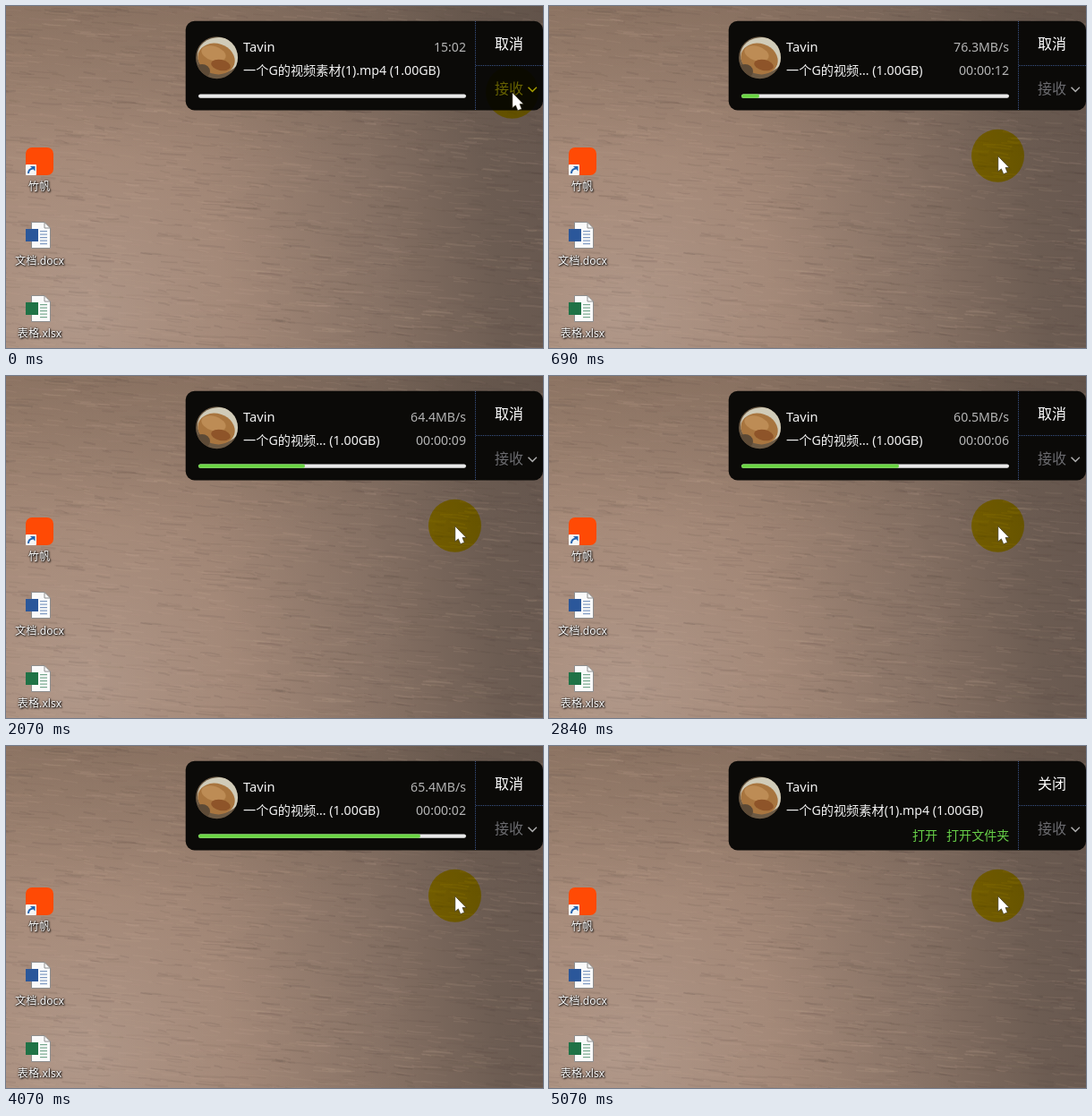
Write an HTML page with a canvas that moves like this. It is 600 px wide and 382 px high and loops after 5.14 s.

```html
<!DOCTYPE html>
<html lang="zh">
<head>
<meta charset="utf-8">
<title>文件传输</title>
<style>
  html, body { margin: 0; width: 100%; height: 100%; overflow: hidden; background: #80695c; }
  canvas, svg { position: absolute; left: 0; top: 0; width: 600px; height: 382px; display: block; }
  text { font-family: "Noto Sans", "Noto Sans CJK SC", "Noto Sans CJK", sans-serif; font-size: 14.1px; fill: #f2f2f2; }
  .name { font-size: 14.7px; }
  .file { font-size: 14.2px; font-weight: 500; }
  .dim { fill: #b4b4b4; text-anchor: end; }
  .btn { font-size: 16px; font-weight: 500; fill: #fff; }
  .off { font-size: 16px; fill: #6c6c70; }
  .link { fill: #67cf48; }
  .label { font-size: 12.2px; fill: #fff; text-anchor: middle; text-shadow: 1px 1px 2px #000, 0 0 2px #000; }
  #halo { position: absolute; left: 0; top: 0; width: 59px; height: 59px; margin: -29.5px; border-radius: 50%;
    background: rgb(243, 232, 0); mix-blend-mode: multiply; }
</style>
</head>
<body>
<canvas id="desk" width="600" height="382"></canvas>
<svg viewBox="0 0 600 382">
  <text class="label" x="37" y="206">竹帆</text>
  <text class="label" x="37.5" y="288.5">文档.docx</text>
  <text class="label" x="37.5" y="370">表格.xlsx</text>

  <text class="name" x="265" y="50.5">Tavin</text>
  <text id="file" class="file" x="265" y="77"></text>
  <text id="info" class="dim" x="514" y="50.5"></text>
  <text id="left" class="dim" x="514" y="77"></text>
  <g id="bar">
    <rect x="215" y="98.4" width="299" height="4.4" rx="2.2" fill="#e9e9e9"/>
    <rect id="fill" x="215" y="98.4" width="0" height="4.4" rx="2.2" fill="#6bd644"/>
  </g>
  <g id="links">
    <text class="link" x="406" y="105">打开</text>
    <text class="link" x="444" y="105">打开文件夹</text>
  </g>
  <text id="top" class="btn" x="546" y="48"></text>
  <text class="off" x="546" y="98">接收</text>
  <path d="M583.5 90.7l4.7 4.7l4.7-4.7" fill="none" stroke="#a8a8a8" stroke-width="1.5"/>
</svg>
<div id="halo"></div>
<svg viewBox="0 0 600 382">
  <path id="arrow" d="M0 0V17L3.6 14.2L6 20L10.4 18.2L8.2 12.8H12.4Z" fill="#fff" stroke="#2a2510" stroke-width=".6"/>
</svg>
<script>
const LOOP = 5140, STEPS = 67, START = 5, DONE = 63;
const HELD = [13, 24, 40, 51, 62];
// [step, filled pixels] and [tick, MB/s]
const FILL = [[5.5, 0], [9, 20], [19, 80], [27, 119], [37, 176], [53, 248], [63, 299]];
const SPEED = [[1, 74.8], [2, 76.3], [4, 68.5], [6, 64.4], [9, 60.5], [13, 65.4], [15, 66.8]];
const BAR = 299, SIZE = 1024;

const $ = id => document.getElementById(id);
const el = Object.fromEntries(['file', 'info', 'left', 'bar', 'fill', 'links', 'top', 'halo', 'arrow']
  .map(id => [id, $(id)]));

function lerpKeys(keys, x) {
  if (x <= keys[0][0]) return keys[0][1];
  for (let i = 1; i < keys.length; i++) {
    const [a, u] = keys[i - 1], [b, v] = keys[i];
    if (x <= b) return u + (v - u) * (x - a) / (b - a);
  }
  return keys[keys.length - 1][1];
}

function seeded(seed) {
  return () => (seed = (seed * 16807) % 2147483647) / 2147483647;
}

const g = $('desk').getContext('2d');

function wash(grad, stops) {
  stops.forEach(([at, color]) => grad.addColorStop(at, color));
  g.fillStyle = grad;
  g.fillRect(0, 0, 600, 382);
}

function box(x, y, w, h, r, color) {
  g.fillStyle = color;
  g.beginPath();
  g.roundRect(x, y, w, h, r);
  g.fill();
}

function blob(x, y, rx, ry, color, turn = 0) {
  g.fillStyle = color;
  g.beginPath();
  g.ellipse(x, y, rx, ry, turn, 0, 7);
  g.fill();
}

function drawWater() {
  wash(g.createLinearGradient(0, 80, 600, 0),
    [[0, '#a08370'], [.35, '#9b7f6d'], [.65, '#846f62'], [.85, '#6c5c52'], [1, '#65564e']]);
  wash(g.createRadialGradient(80, 350, 0, 80, 350, 380),
    [[0, 'rgba(194,174,164,.48)'], [.5, 'rgba(186,162,150,.25)'], [1, 'rgba(150,135,128,0)']]);
  wash(g.createLinearGradient(0, 0, 0, 170),
    [[0, 'rgba(90,76,64,.28)'], [1, 'rgba(90,76,64,0)']]);
  const rnd = seeded(71);
  for (let i = 0; i < 2600; i++) {
    const x = rnd() * 650 - 40, y = rnd() * 382, w = 8 + rnd() * 26;
    const a = .03 + rnd() * .08;
    g.strokeStyle = rnd() < .5 ? `rgba(70,56,52,${a})` : `rgba(220,188,166,${a})`;
    g.lineWidth = .8 + rnd() * 1.4;
    g.beginPath();
    g.moveTo(x, y);
    g.quadraticCurveTo(x + w / 2, y + rnd() * 4 - 1, x + w, y + 1 + rnd() * 2);
    g.stroke();
  }
}

function drawPage(y, color) {
  g.fillStyle = '#fafafa';
  g.strokeStyle = '#8d8d8d';
  g.lineWidth = 1;
  g.beginPath();
  g.moveTo(28.5, y + .5);
  g.lineTo(43, y + .5);
  g.lineTo(49.5, y + 7);
  g.lineTo(49.5, y + 29.5);
  g.lineTo(28.5, y + 29.5);
  g.closePath();
  g.fill();
  g.stroke();
  g.beginPath();
  g.moveTo(43, y + .5);
  g.lineTo(43, y + 7);
  g.lineTo(49.5, y + 7);
  g.stroke();
  for (let i = 0; i < 5; i++) box(38, y + 10 + i * 3.5, 8, 1.2, 0, color + '99');
  box(22, y + 8, 14, 14, 0, color);
}

function drawIcons() {
  box(22, 158, 31, 31, 7, '#ff4a05');
  box(22, 177, 12, 12, 1, '#f5f5f5');
  g.strokeStyle = '#2464b0';
  g.lineWidth = 2;
  g.beginPath();
  g.moveTo(25, 187);
  g.quadraticCurveTo(25, 182, 30, 181.5);
  g.stroke();
  g.fillStyle = '#2464b0';
  g.beginPath();
  g.moveTo(27, 179);
  g.lineTo(32.5, 179);
  g.lineTo(32.5, 184.5);
  g.fill();
  drawPage(241, '#2b579a');
  drawPage(323, '#1f7246');
}

function drawPanel() {
  box(200.7, 16.7, 399.3, 99.8, 10, '#0b0a08');
  g.strokeStyle = '#3a5488';
  g.lineWidth = 1;
  g.setLineDash([1, 1]);
  g.beginPath();
  g.moveTo(524.5, 17);
  g.lineTo(524.5, 116);
  g.moveTo(525, 66.5);
  g.lineTo(600, 66.5);
  g.stroke();
  g.setLineDash([]);
}

function drawAvatar() {
  g.save();
  g.beginPath();
  g.arc(235.5, 57.7, 23.5, 0, 7);
  g.clip();
  box(211, 34, 49, 49, 0, '#6d5a44');
  blob(238, 55, 24, 20, '#d0cbb8');
  blob(235, 59, 21, 17, '#a8753f', .3);
  blob(232, 53, 14, 8, '#bd8c55', .3);
  blob(240, 66, 11, 6, '#8e5429', .2);
  blob(219, 73, 9, 8, '#5d4a36');
  g.restore();
}

function render(t) {
  let n = Math.min(STEPS - 1, Math.floor((t + 9) / (LOOP / STEPS)));
  if (HELD.includes(n)) n--;
  const busy = n >= START && n < DONE, done = n >= DONE;

  const px = lerpKeys(FILL, n);
  const speed = lerpKeys(SPEED, Math.floor((n - 1) / 4));
  const secs = Math.floor(SIZE * (1 - px / BAR) / speed);
  el.file.textContent = busy ? '一个G的视频... (1.00GB)' : '一个G的视频素材(1).mp4 (1.00GB)';
  el.info.textContent = done ? '' : busy ? speed.toFixed(1) + 'MB/s' : '15:02';
  el.left.textContent = busy ? '00:00:' + String(secs).padStart(2, '0') : '';
  el.top.textContent = done ? '关闭' : '取消';
  el.fill.setAttribute('width', px);
  el.bar.style.display = done ? 'none' : '';
  el.links.style.display = done ? '' : 'none';

  const k = Math.max(0, Math.min(1, (n - 3) / 5));
  const e = k * k * (3 - 2 * k);
  const x = 565 - 64 * e, y = 95.7 + 71 * e;
  el.halo.style.transform = `translate(${x}px, ${y}px)`;
  el.arrow.setAttribute('transform', `translate(${x + .8} ${y + 1})`);
}

drawWater();
drawIcons();
drawPanel();
drawAvatar();

function tick() {
  render(performance.now() % LOOP);
  requestAnimationFrame(tick);
}
render(0);
requestAnimationFrame(tick);
</script>
</body>
</html>
```
